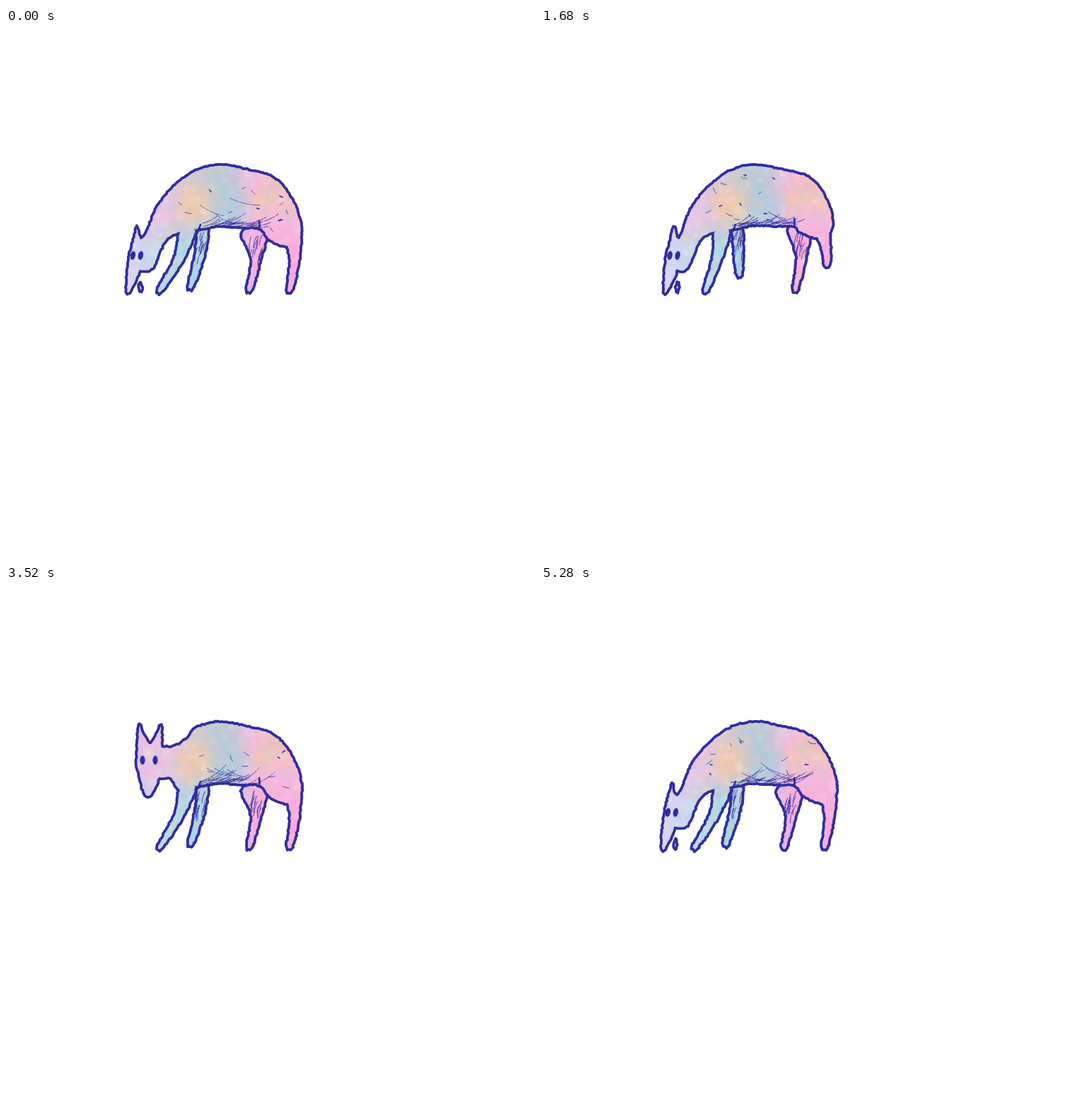
An HTML page with a canvas that plays this animation: 748x748 px, repeating every 5.36 s.

```html
<!DOCTYPE html>
<html lang="en">
<head>
<meta charset="utf-8">
<title>Grazing animal</title>
<style>
html, body { margin: 0; width: 100%; height: 100%; overflow: hidden; background: #fff; }
canvas { display: block; }
</style>
</head>
<body>
<canvas id="stage" width="748" height="748"></canvas>
<script>
const SIZE = 748, STEP = 80, LOOP = 5360, STRIDE = 1280, WALK = 2 * STRIDE;
const INK = '#302da0', LINE = 3.8;
const ctx = document.getElementById('stage').getContext('2d');
const layer = () => {
  const c = document.createElement('canvas');
  c.width = c.height = SIZE;
  return c.getContext('2d');
};
const scratch = layer();

const lerp = (a, b, k) => a + (b - a) * k;
const mix = (a, b, k) => a.map((v, i) => lerp(v, b[i], k));
const ease = (from, to, v) => {
  const k = Math.min(1, Math.max(0, (v - from) / (to - from)));
  return k * k * (3 - 2 * k);
};

function random(seed) {
  return () => {
    seed = (seed + 0x6D2B79F5) | 0;
    let n = Math.imul(seed ^ (seed >>> 15), 1 | seed);
    n = (n + Math.imul(n ^ (n >>> 7), 61 | n)) ^ n;
    return ((n ^ (n >>> 14)) >>> 0) / 4294967296;
  };
}

// Watercolour fixed to the stage: one band of colour for the back, one for the legs
function makeWash() {
  const w = layer(), rnd = random(7);
  const band = (x0, x1, colours) => {
    const g = w.createLinearGradient(x0, 0, x1, 0);
    colours.forEach((c, i) => g.addColorStop(i / (colours.length - 1), c));
    return g;
  };
  const blob = (x, y, r, colour, alpha) => {
    const g = w.createRadialGradient(x, y, 0, x, y, r);
    g.addColorStop(0, colour);
    g.addColorStop(0.4, colour + 'c0');
    g.addColorStop(1, colour + '00');
    w.globalAlpha = alpha;
    w.fillStyle = g;
    w.fillRect(x - r, y - r, 2 * r, 2 * r);
  };
  w.fillStyle = band(190, 430, ['#e4bfe6', '#e8c6e2', '#d2cbcd', '#b2cbdb', '#f2b8dc', '#f3c6b6', '#f4bcdc']);
  w.fillRect(0, 0, SIZE, SIZE);
  blob(268, 250, 38, '#f6cba4', 0.9);
  blob(318, 255, 36, '#adcedb', 0.8);
  blob(364, 246, 28, '#f3c9b4', 0.9);
  blob(388, 284, 46, '#f6b8e4', 0.95);
  w.fillStyle = band(175, 355, ['#ddd4f2', '#c6d9f0', '#aadae6', '#a2d2e2', '#d0bfe2', '#fba9de']);
  for (let y = 262; y < 400; y++) {
    w.globalAlpha = ease(262, 316, y);
    w.fillRect(0, y, SIZE, 1);
  }
  const tints = ['#ffffff', '#f6b4dc', '#a4cfe0', '#f8cfa4', '#c4b8d0'];
  for (let i = 0; i < 900; i++) {
    blob(155 + rnd() * 290, 185 + rnd() * 195, 2 + rnd() * 9, tints[i % 5], 0.16);
  }
  return ctx.createPattern(w.canvas, 'no-repeat');
}
const wash = makeWash();

// Closed smooth curve drawn with a shaky hand
function roughPath(pts, rnd) {
  const path = new Path2D(), n = pts.length, shake = () => (rnd() - 0.5) * 1.7;
  pts.forEach((b, i) => {
    const a = pts[(i + n - 1) % n], c = pts[(i + 1) % n], d = pts[(i + 2) % n];
    const steps = Math.max(2, Math.round(Math.hypot(c[0] - b[0], c[1] - b[1]) / 3));
    for (let s = 0; s < steps; s++) {
      const u = s / steps;
      const [x, y] = [0, 1].map(k => b[k] + 0.5 * u * (c[k] - a[k] +
        u * (2 * a[k] - 5 * b[k] + 4 * c[k] - d[k] + u * (3 * (b[k] - c[k]) + d[k] - a[k]))));
      path.lineTo(x + shake(), y + shake());
    }
  });
  path.closePath();
  return path;
}

// Head: u runs from brow to nose, v across in half widths; up = 0 grazing, 1 looking
const FACE = [
  [0.05, 1], [-1, 0.85], [0, 0.05], [-1, -0.88], [0.15, -1], [0.36, -1],
  [0.67, -0.7], [0.97, -0.25], [0.98, 0.25], [0.76, 0.75], [0.48, 1]];

function makeHead(up, sway) {
  const brow = mix([191 + sway, 296], [203, 223], up);
  const nose = mix([172 + sway, 376], [200, 300], up);
  const half = lerp(11, 18, up), ear = lerp(0.2, 0.34, up);
  const at = ([u, v]) => {
    const [x, y] = mix(brow, nose, u < 0 ? u * ear : u);
    return [x + v * half, y];
  };
  return {
    outline: FACE.map(at),
    centre: at([0.5, 0]),
    eyes: [at([0.32, -0.5]), at([0.32, 0.5])],
    tongue: [nose[0] + 18 * (1 - up), nose[1] - 9]
  };
}

// Trunk: the rump is drawn in with each stretch, the neck bends towards the head
const BACK = [[419, 290], [414, 262], [403, 238], [387, 217], [368, 206], [338, 199], [305, 193], [270, 200]];
const BELLY = [[271, 286], [300, 281], [332, 283], [358, 284]];
const THIGH = [[372, 300], [396, 310], [411, 309]];

function makeTrunk(up, stretch, centre) {
  const pull = ([x, y]) => x < 360 ? [x, y] :
    [x - stretch * (y - 200) * 0.28, y - stretch * (y - 200) * 0.45];
  const belly = BELLY.map(([x, y]) => [x, y - stretch * (x - 270) * 0.16]);
  const withers = BACK[BACK.length - 1];
  const bend = mix([213, 230], [248, 231], up), crown = mix([198, 290], [216, 231], up);
  const neck = [0.33, 0.67, 1].map(k => mix(mix(withers, bend, k), mix(bend, crown, k), k));
  const throat = [mix([206, 342], [216, 274], up), mix([225, 303], [232, 274], up), [245, 290]];
  return {
    belly,
    outline: [...BACK.map(pull), ...neck, centre, ...throat, ...belly, ...THIGH.map(pull)]
  };
}

// Gait over one stride: phase, hip x, foot x, foot y
const FRONT = [[0, 257, 218, 370], [0.24, 241, 240, 371], [0.32, 258, 232, 371], [0.5, 279, 261, 366], [0.78, 282, 291, 346]];
const HIND = [[0, 405, 401, 370], [0.24, 384, 430, 337], [0.32, 398, 402, 336], [0.5, 351, 344, 370], [0.75, 352, 326, 371], [0.82, 367, 364, 369]];

function gait(keys, phase) {
  const q = phase % 1, next = keys.findIndex(k => k[0] > q);
  const a = keys.at(next < 0 ? -1 : next - 1);
  const b = next < 0 ? [1, ...keys[0].slice(1)] : keys[next];
  return mix(a, b, (q - a[0]) / (b[0] - a[0])).slice(1);
}

function makeLeg(hind, far, phase, stretch) {
  const [hx, fx, fy] = gait(hind ? HIND : FRONT, phase + (far ? 0.5 : 0));
  const hy = hind ? 290 - 22 * stretch : 286;
  const width = hind ? 24 + (401 - fx) * 0.24 : far ? 16 : 24;
  const bend = hind ? 4 + (hx - fx) * 0.25 : (hx - fx) * 0.18;
  const hip = [hx, hy], foot = [fx, fy], knee = [(hx + fx) / 2 + bend, (hy + fy) / 2 - 2];
  const edge = side => [[hip, hip, knee, width / 2], [knee, hip, foot, 7.5], [foot, knee, foot, 4.8]]
    .map(([[x, y], [ax, ay], [bx, by], half]) => {
      const k = side * half / Math.hypot(bx - ax, by - ay);
      return [x + (by - ay) * k, y - (bx - ax) * k];
    });
  return {
    hip, knee,
    outline: [mix(hip, knee, -0.25), ...edge(1), mix(knee, foot, 1.1), ...edge(-1).reverse()]
  };
}

function ink(path) {
  ctx.fillStyle = ctx.strokeStyle = INK;
  ctx.lineWidth = LINE;
  ctx.fill(path);
  ctx.stroke(path);
}

// Paints the wash inside a shape, up to the inner edge of its line
function paint(path) {
  scratch.globalCompositeOperation = 'source-over';
  scratch.clearRect(0, 0, SIZE, SIZE);
  scratch.fillStyle = wash;
  scratch.fill(path);
  scratch.globalCompositeOperation = 'destination-out';
  scratch.lineWidth = LINE;
  scratch.stroke(path);
  ctx.drawImage(scratch.canvas, 0, 0);
}

function line(x, y, dx, dy, width) {
  ctx.lineWidth = width;
  ctx.beginPath();
  ctx.moveTo(x, y);
  ctx.quadraticCurveTo(x + dx * 0.5 - dy * 0.12, y + dy * 0.5 + dx * 0.12, x + dx, y + dy);
  ctx.stroke();
}

function inside(path, draw) {
  ctx.save();
  ctx.clip(path);
  draw();
  ctx.restore();
}

function hatchLeg(path, { hip, knee }, rnd) {
  inside(path, () => {
    ctx.setLineDash([7, 1.5, 3, 1]);
    for (let i = 0; i < 14; i++) {
      const [x, y] = mix(hip, knee, rnd() * 0.8);
      line(x + (rnd() - 0.3) * 18, y, -6 + rnd() * 5, 10 + rnd() * 12, 0.9);
    }
  });
}

function markBody(path, belly, rnd) {
  const front = belly[0], back = belly.at(-1);
  inside(path, () => {
    for (let i = 0; i < 14; i++) {
      const angle = (rnd() - 0.35) * 2, size = 2 + rnd() * 8;
      line(222 + rnd() * 175, 206 + rnd() * 85, Math.cos(angle) * size, Math.sin(angle) * size, size < 5 ? 1.6 : 0.8);
    }
    ctx.setLineDash([9, 1.5, 3, 2, 1, 1]);
    const rise = -0.3 - rnd() * 0.5;
    for (let i = 0; i < 24; i++) {
      const [x, y] = mix(front, back, rnd()), size = 12 + rnd() * 24;
      line(x - 4, y - 1 - rnd() * 9, size, size * rise * rnd(), 0.9);
    }
    for (let i = 0; i < 3; i++) line(272 + rnd() * 60, 240 + rnd() * 30, 20 + rnd() * 25, 8 + rnd() * 10, 0.7);
  });
  line(...front, 4, -8, 2.6);
  line(...back, 0, -11, 2.8);
}

function drawFrame(index) {
  const t = index * STEP, rnd = random(index * 977 + 5);
  const phase = t < WALK ? t % STRIDE / STRIDE : 0;
  const stretch = 1.1 * Math.sin(Math.PI * phase ** 1.6) ** 2;
  const up = ease(3040, 3360, t) - ease(4960, 5200, t);
  const head = makeHead(up, 3 * Math.sin(2 * Math.PI * phase));
  const trunk = makeTrunk(up, stretch, head.centre);
  const legs = far => [false, true].map(hind => makeLeg(hind, far, phase, stretch));

  ctx.fillStyle = '#fff';
  ctx.fillRect(0, 0, SIZE, SIZE);
  ctx.lineCap = ctx.lineJoin = scratch.lineJoin = 'round';

  const [tx, ty] = head.tongue;
  const tongue = roughPath([[tx, ty - 8], [tx + 3, ty], [tx, ty + 7], [tx - 3, ty]], rnd);
  ink(tongue);
  paint(tongue);
  for (const leg of legs(true)) {
    const path = roughPath(leg.outline, rnd);
    ink(path);
    paint(path);
    hatchLeg(path, leg, rnd);
  }

  const near = [trunk, head, ...legs(false)].map(part => roughPath(part.outline, rnd));
  near.forEach(ink);
  near.forEach(paint);
  ctx.strokeStyle = INK;
  markBody(near[0], trunk.belly, rnd);

  ctx.fillStyle = INK;
  for (const [x, y] of head.eyes) {
    ctx.beginPath();
    ctx.ellipse(x, y, 3.6, 6.3, 0.2 * (1 - up), 0, 7);
    ctx.fill();
  }
}

let shown = -1;
const start = performance.now();
function tick() {
  const index = Math.floor(((performance.now() - start) % LOOP) / STEP);
  if (index !== shown) drawFrame(shown = index);
  requestAnimationFrame(tick);
}
tick();
</script>
</body>
</html>
```
